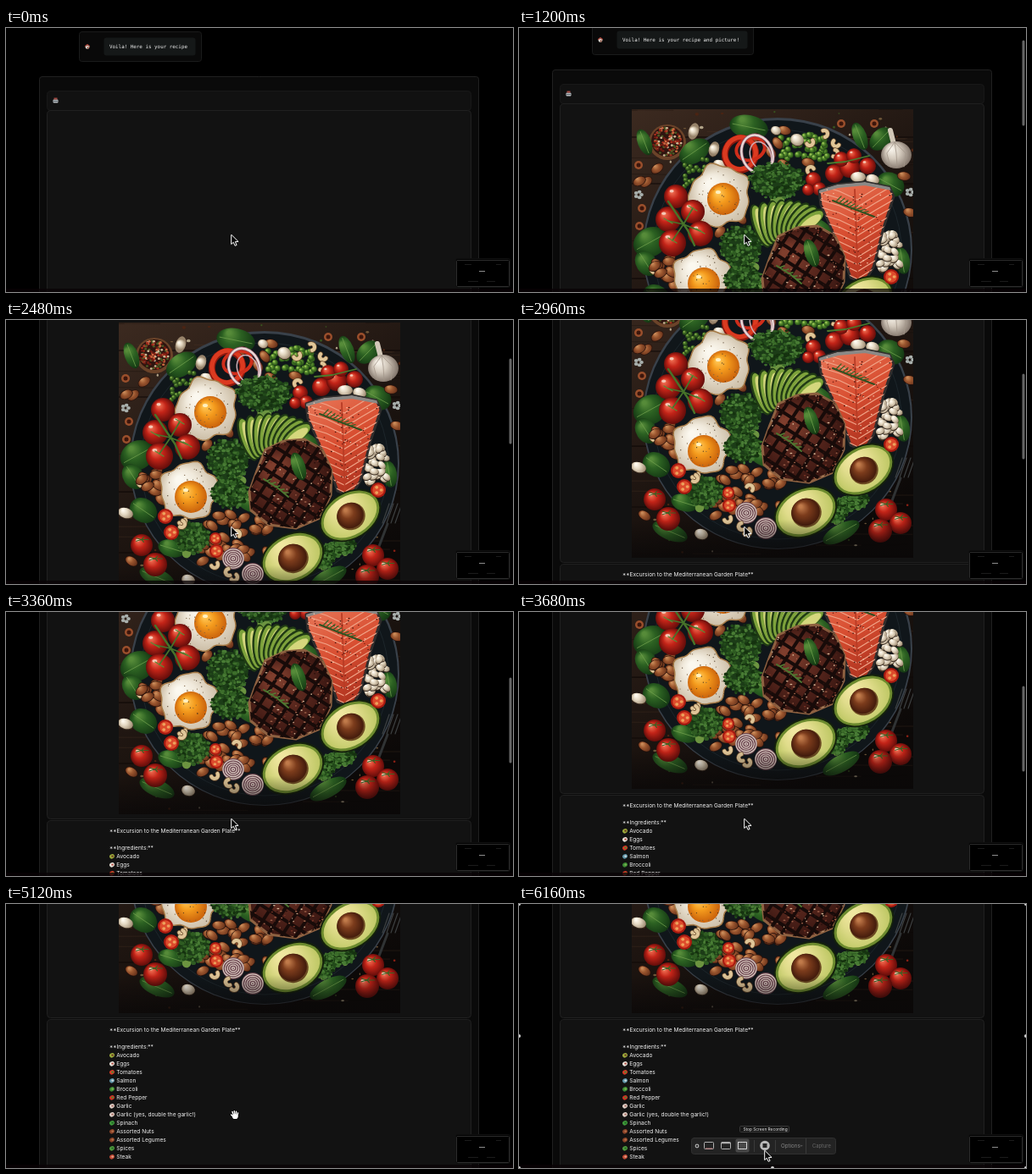
Write an HTML page with a canvas that moves like this. It is 598 px wide and 312 px high and loops after 6240 ms.

```html
<!DOCTYPE html>
<html lang="en">
<head>
<meta charset="utf-8">
<title>Recipe board</title>
<style>
  html, body { margin: 0; width: 100%; height: 100%; overflow: hidden; background: #000; }
  canvas { display: block; width: 598px; height: 312px; }
</style>
</head>
<body>
<canvas id="stage" width="598" height="312"></canvas>
<script>
const W = 598, H = 312, LOOP = 6240, STEP = 80;
const MONO = '5.88px "DejaVu Sans Mono", monospace';
const SANS = '6.6px Inter, sans-serif';
const stage = document.getElementById('stage').getContext('2d');

let seed = 7;
const rnd = () => {
  seed = (seed * 16807) % 2147483647;
  return seed / 2147483647;
};
const between = (a, b) => a + rnd() * (b - a);
const pick = list => list[Math.floor(rnd() * list.length)];

function oval(g, x, y, rx, ry, color, turn = 0) {
  g.beginPath();
  g.ellipse(x, y, rx, ry, turn, 0, 7);
  g.fillStyle = color;
  g.fill();
}
function line(g, points, color, width) {
  g.beginPath();
  points.forEach(([x, y]) => g.lineTo(x, y));
  g.strokeStyle = color;
  g.lineWidth = width;
  g.stroke();
}
function box(g, x, y, w, h, r, fill, border) {
  g.beginPath();
  g.roundRect(x + 0.5, y + 0.5, w - 1, h - 1, r);
  if (fill) { g.fillStyle = fill; g.fill(); }
  if (border) { g.strokeStyle = border; g.lineWidth = 1; g.stroke(); }
}
function text(g, str, x, y, font, color) {
  g.font = font;
  g.fillStyle = color;
  g.fillText(str, x, y);
}

// ---- The dish, painted once ----
function paintDish() {
  const c = document.createElement('canvas');
  c.width = c.height = 332;
  const g = c.getContext('2d');
  g.lineCap = g.lineJoin = 'round';

  const shade = (x, y, r, light, mid, dark) => {
    const s = g.createRadialGradient(x - r * .35, y - r * .4, r * .1, x, y, r * 1.05);
    s.addColorStop(0, light);
    s.addColorStop(.4, mid);
    s.addColorStop(1, dark);
    return s;
  };
  const tomato = (x, y, r) => {
    oval(g, x, y, r, r, shade(x, y, r, '#ee6b4f', '#c32418', '#5c0b09'));
    oval(g, x - r * .35, y - r * .45, r * .18, r * .12, '#f6c9b8');
  };
  const halfTomato = (x, y, r) => {
    oval(g, x, y, r, r, '#a81a10');
    oval(g, x, y, r * .75, r * .75, '#dd4b2c');
    for (let a = 0; a < 6; a += 2.1)
      oval(g, x + Math.cos(a) * r * .4, y + Math.sin(a) * r * .4, r * .22, r * .2, '#eda25c');
  };
  const leaf = (x, y, rx, ry, turn) => {
    oval(g, x, y, rx, ry, shade(x, y, Math.max(rx, ry), '#568b39', '#2c6122', '#123512'), turn);
    const dx = Math.cos(turn) * rx * .85, dy = Math.sin(turn) * rx * .85;
    line(g, [[x - dx, y - dy], [x + dx, y + dy]], '#6f9f4c', .8);
  };
  const almond = (x, y, turn = between(-1, 1)) => {
    oval(g, x, y, 8.2, 5.5, '#2a120b', turn);
    oval(g, x, y, 7.5, 4.8, shade(x, y, 8, '#c98a58', '#9a552e', '#5c2b17'), turn);
  };
  const bean = (x, y, rx, ry, turn = between(-1, 1)) => {
    oval(g, x, y + 1, rx, ry, '#3a2c20', turn);
    oval(g, x, y, rx, ry, shade(x, y, rx, '#fffaf0', '#e4d8c2', '#97836a'), turn);
  };
  const cashew = (x, y, a = between(0, 6)) => {
    g.beginPath();
    g.arc(x, y, 4, a, a + 3.3);
    g.strokeStyle = '#6c4c2e'; g.lineWidth = 5.6; g.stroke();
    g.strokeStyle = '#e0c698'; g.lineWidth = 4.2; g.stroke();
  };
  const broccoli = (x, y, rx, ry, stemX, stemY) => {
    line(g, [[x, y], [stemX, stemY]], '#6c9440', rx * .5);
    oval(g, x, y, rx * .92, ry * .9, '#1c3c17');
    for (let i = 0; i < rx * 7; i++) {
      const a = between(0, 6.3), d = Math.sqrt(rnd());
      oval(g, x + Math.cos(a) * rx * d, y + Math.sin(a) * ry * d, between(1, 3), between(1, 2.4),
        pick(['#15320f', '#224a1a', '#2f5c22', '#3d6e2b', '#497c35']));
    }
  };
  const friedEgg = (x, y, rx, ry, yx, yy) => {
    g.beginPath();
    for (let a = 0; a < 6.28; a += .1) {
      const k = 1 + .07 * Math.sin(a * 5 + x) + .04 * Math.sin(a * 9);
      g.lineTo(x + Math.cos(a) * rx * k, y + Math.sin(a) * ry * k);
    }
    g.closePath();
    g.fillStyle = shade(x, y, rx, '#fbf8ef', '#f0e9db', '#cdbfa8');
    g.fill();
    g.strokeStyle = '#a67b48'; g.lineWidth = 1.5; g.stroke();
    oval(g, yx, yy, 19, 19, shade(yx, yy, 19, '#ffc552', '#f49b1d', '#c75e0a'));
    oval(g, yx - 6, yy - 8, 3, 2, '#fff0c0');
    for (let i = 0; i < 45; i++)
      oval(g, x + between(-.8, .8) * rx, y + between(-.8, .8) * ry, .6, .6, pick(['#45311f', '#7b6140']));
  };
  const avocado = (x, y, rx, ry, turn, pit) => {
    oval(g, x, y, rx + 2, ry + 2, '#14210c', turn);
    oval(g, x, y, rx, ry, '#6c8a2e', turn);
    oval(g, x, y, rx - 3, ry - 3, shade(x, y, rx, '#f0e6a0', '#e0dc8b', '#b5c25a'), turn);
    oval(g, x + 1, y + 1, pit + 1, pit, '#6b4a22', turn);
    oval(g, x, y, pit, pit - 1, shade(x, y, pit, '#c07a4a', '#7c3c1c', '#3c170a'), turn);
  };
  const ring = (x, y, rx, ry, color, width, turn = 0) => {
    g.beginPath();
    g.ellipse(x, y, rx, ry, turn, 0, 7);
    g.strokeStyle = color; g.lineWidth = width; g.stroke();
  };
  const onion = (x, y, r) => {
    oval(g, x, y, r, r, '#6c4650');
    for (let k = r - 1; k > 1; k -= 2.6) ring(x, y, k, k * .92, '#dccdc3', 1.2);
  };

  // Table
  const wood = g.createLinearGradient(0, 0, 200, 332);
  wood.addColorStop(0, '#3c2a20');
  wood.addColorStop(.5, '#211712');
  wood.addColorStop(1, '#0c0908');
  g.fillStyle = wood;
  g.fillRect(0, 0, 332, 332);
  g.globalAlpha = .35;
  for (let i = 0; i < 90; i++) {
    const x = between(-40, 320), y = between(0, 332);
    line(g, [[x, y], [x + between(20, 80), y + between(-1, 1)]], pick(['#0d0806', '#553c2b']), .8);
  }
  g.globalAlpha = 1;
  [33, 88, 200, 272].forEach(y => line(g, [[0, y], [332, y]], '#0e0806', 1.2));

  g.translate(-133, -3);
  for (let i = 0; i < 70; i++) {
    const a = between(0, 6.3), d = between(160, 205);
    oval(g, 300 + Math.cos(a) * d, 170 + Math.sin(a) * d, between(.6, 2.4), between(.6, 2),
      pick(['#8c2015', '#6f5638', '#b0a287', '#38531f', '#4b2413']));
  }
  oval(g, 305, 169, 159, 156, '#39414a');
  oval(g, 305, 170, 157, 154, '#10161a');
  ring(305, 170, 146, 143, '#1d262b', 1);

  // Spices and things on the table
  oval(g, 175, 42, 22, 21, '#6b4329');
  oval(g, 175, 41, 19, 18, '#2f1510');
  for (let i = 0; i < 130; i++) {
    const a = between(0, 6.3), d = Math.sqrt(rnd()) * 17;
    oval(g, 175 + Math.cos(a) * d, 41 + Math.sin(a) * d, 1.5, 1.3,
      pick(['#a32d1c', '#cbb795', '#6f1b12', '#4b5b25', '#d0663f']));
  }
  [[141, 69], [145, 120], [142, 141], [419, 20], [380, 20]].forEach(([x, y]) => {
    oval(g, x, y, 5, 5, '#9a4f2c');
    oval(g, x, y, 2.5, 2.5, '#3c160c');
  });
  [[141, 104], [461, 101]].forEach(([x, y]) => {
    for (let a = 0; a < 6; a += 1.26) oval(g, x + Math.cos(a) * 3.5, y + Math.sin(a) * 3.5, 2.3, 2, '#a9b0ad');
  });
  for (const x of [444, 449, 454, 459]) line(g, [[x + 8, 217], [x, 240]], '#3d4041', 1.2);
  line(g, [[450, 241], [436, 278]], '#303334', 3);

  // Greens
  [[271, 24, 23, 14, .2], [207, 53, 20, 13, -.6], [148, 42, 16, 8, 1.2], [155, 160, 21, 17, -.5],
   [162, 225, 17, 14, .6], [150, 185, 16, 12, 1], [402, 35, 17, 8, 1.2], [427, 38, 16, 11, -.8],
   [438, 92, 17, 14, .5], [452, 182, 16, 9, 1.4], [178, 304, 22, 10, .4], [380, 305, 24, 10, -.5],
   [230, 92, 18, 12, .2], [355, 150, 22, 14, .8], [290, 215, 20, 12, .4], [195, 270, 16, 10, .3]
  ].forEach(p => leaf(...p));
  for (let i = 0; i < 55; i++) {
    const x = between(308, 366), y = between(33, 62);
    oval(g, x, y, 3.6, 3.6, shade(x, y, 3.6, '#a4c95c', '#558b2b', '#204615'));
  }
  for (let i = 0; i < 26; i++) {
    const x = between(195, 225), y = between(62, 95);
    oval(g, x, y, 3, 3, shade(x, y, 3, '#8eb252', '#436f24', '#193712'));
  }

  // Nuts and beans
  [[150, 89], [163, 73], [142, 88], [305, 43], [297, 54], [277, 38], [313, 28], [454, 82], [461, 125],
   [341, 66], [237, 148], [262, 132], [148, 285], [232, 285], [312, 68]].forEach(([x, y]) => almond(x, y));
  [[206, 29, 6, 10], [230, 50, 6, 9], [328, 39, 8, 7], [303, 28, 6, 5], [141, 228, 9, 6],
   [215, 307, 8, 6], [237, 68, 8, 5]].forEach(p => bean(...p, .3));
  [[343, 42], [374, 43], [360, 32], [372, 55], [344, 75], [160, 192], [178, 193], [208, 238]].forEach(p => cashew(...p));
  for (let i = 0; i < 28; i++) bean(between(424, 449), between(148, 192), 5.5, 3.6);
  for (let i = 0; i < 12; i++) almond(between(158, 184), between(178, 214));
  for (let i = 0; i < 34; i++) almond(between(228, 312), between(229, 280));

  // Peppers, onion, garlic
  ring(261, 56, 18, 19, '#8c170d', 8, .4);
  ring(261, 55, 18, 19, '#db3a20', 5.5, .4);
  ring(273, 50, 17, 13, '#cf2d1a', 4, -.3);
  ring(281, 56, 18, 23, '#8d5a6c', 4, -.35);
  ring(281, 56, 18, 23, '#ead8d6', 2.4, -.35);
  ring(285, 58, 12, 17, '#cfaeb6', 1.5, -.35);
  line(g, [[438, 28], [443, 48]], '#d2c8b8', 6);
  oval(g, 445, 57, 18, 16, shade(445, 57, 18, '#f6f1e8', '#d4cabd', '#776a60'));
  [-8, 0, 8].forEach(d => line(g, [[443, 42], [445 + d * 1.4, 55], [446 + d, 71]], '#a4978b', .8));

  // Eggs and vine tomatoes
  friedEgg(237, 105, 35, 36, 241, 109);
  friedEgg(216, 202, 34, 33, 218, 209);
  [[185, 106, 14], [205, 124, 14], [176, 133, 15], [214, 150, 15], [181, 161, 16]].forEach(p => tomato(...p));
  line(g, [[176, 112], [188, 130], [199, 146], [207, 164]], '#47732a', 2.4);
  [[205, 120], [176, 135], [214, 147], [181, 158]].forEach(([x, y]) => {
    line(g, [[194, 139], [x, y]], '#47732a', 1.7);
    line(g, [[x - 5, y - 3], [x + 5, y + 3]], '#5c8a35', 1.4);
  });
  [[372, 79, 11], [390, 72, 12], [380, 62, 9], [395, 58, 9], [411, 70, 10], [347, 86, 9],
   [354, 97, 8], [341, 98, 7]].forEach(p => tomato(...p));
  line(g, [[364, 67], [385, 65], [413, 58]], '#4c7b2e', 1.8);
  bean(400, 83, 9, 6, 0);
  bean(417, 86, 8, 6, .3);

  broccoli(304, 87, 33, 22, 305, 116);
  broccoli(262, 165, 26, 25, 275, 192);
  broccoli(264, 203, 22, 20, 278, 190);

  // Avocado fan
  for (let i = 0; i < 9; i++) {
    const x = 285 + i * 7.2, y = 141 - Math.sin(i / 8 * 2.4) * 9;
    const a = -.35 + i * .16;
    g.save();
    g.translate(x, y);
    g.rotate(a);
    oval(g, 0, 0, 9, 27 - i * .8, '#203b14');
    oval(g, 1, 0, 7.5, 25 - i * .8, '#7da23b');
    oval(g, 2.5, 1, 5.5, 22 - i * .8, '#d5d77d');
    g.restore();
  }

  // Salmon
  const trace = pts => {
    g.beginPath();
    pts.forEach(([x, y]) => g.lineTo(x, y));
    g.closePath();
  };
  g.save();
  trace([[354, 99], [375, 92], [408, 89], [437, 95], [442, 106], [430, 143], [418, 190], [407, 208],
         [391, 202], [382, 176], [366, 139], [356, 116]]);
  const flesh = g.createLinearGradient(355, 90, 420, 205);
  flesh.addColorStop(0, '#e9795a');
  flesh.addColorStop(.5, '#d84e31');
  flesh.addColorStop(1, '#a92f1d');
  g.fillStyle = flesh;
  g.fill();
  g.strokeStyle = '#302d2c'; g.lineWidth = 3; g.stroke();
  g.clip();
  for (let y = 98; y < 240; y += 8.5)
    line(g, [[352, y - 6], [378, y + 2], [399, y + 12], [420, y - 1], [446, y - 16]], '#f0a286', 1.3);
  line(g, [[396, 98], [400, 210]], '#b83c25', 1.8);
  line(g, [[354, 100], [376, 94], [408, 91], [440, 97]], '#8b8986', 4);
  for (let i = 0; i < 130; i++)
    oval(g, between(355, 440), between(98, 204), .9, .7, pick(['#42150f', '#f5c0a2', '#7b2014']));
  g.restore();
  line(g, [[370, 111], [390, 119], [419, 130]], '#324e20', 2);
  for (let i = 0; i < 9; i++) line(g, [[374 + i * 4, 112 + i * 1.6], [380 + i * 4, 106 + i * 2.2]], '#3c6027', 1.3);

  // Steak
  g.save();
  trace([[306, 153], [328, 143], [352, 141], [373, 153], [384, 177], [383, 207], [370, 234], [342, 246],
         [310, 242], [289, 225], [287, 203], [296, 178]]);
  g.fillStyle = shade(335, 195, 55, '#7f3e2d', '#5b281e', '#32130f');
  g.fill();
  g.strokeStyle = '#8e6141'; g.lineWidth = 3; g.stroke();
  g.clip();
  for (let d = -90; d < 100; d += 17) {
    line(g, [[275 + d, 250], [350 + d, 135]], '#180b09', 4);
    line(g, [[280, 165 + d], [390, 235 + d]], '#180b09', 4);
  }
  for (let i = 0; i < 210; i++)
    oval(g, between(288, 383), between(143, 245), between(.5, 1.6), .8,
      pick(['#a2634a', '#27100c', '#763426', '#d5b696', '#4d2119']));
  g.restore();
  leaf(345, 173, 17, 8, 1.25);
  line(g, [[304, 188], [320, 198], [333, 209]], '#4b7530', 2);
  for (let i = 0; i < 5; i++) line(g, [[308 + i * 5, 190 + i * 3.5], [313 + i * 5, 188 + i * 4]], '#547d34', 1.5);

  // Lower plate
  broccoli(220, 257, 21, 19, 213, 276);
  [[384, 272], [400, 267], [374, 284]].forEach(([x, y]) => broccoli(x, y, 12, 10, x, y + 9));
  avocado(406, 231, 37, 26, -.55, 16);
  avocado(338, 281, 37, 27, -.45, 17);
  [[439, 201, 9], [188, 232, 9], [195, 251, 9], [247, 258, 7], [248, 273, 8]].forEach(p => halfTomato(...p));
  onion(268, 282, 13);
  onion(291, 300, 13);
  [[272, 253], [246, 289], [263, 298], [269, 304], [207, 241]].forEach(p => cashew(...p));
  [[160, 266, 13], [176, 289, 14], [433, 278, 13], [450, 294, 13], [426, 303, 14]].forEach(([x, y, r]) => {
    tomato(x, y, r);
    for (let a = 0; a < 6; a += 1.26)
      line(g, [[x, y - r * .5], [x + Math.cos(a) * r * .6, y - r * .5 + Math.sin(a) * 3]], '#3b6123', 1.2);
  });

  const fade = g.createLinearGradient(0, 290, 0, 335);
  fade.addColorStop(0, 'rgba(10,8,8,0)');
  fade.addColorStop(1, 'rgba(10,8,8,.75)');
  g.fillStyle = fade;
  g.fillRect(133, 290, 332, 46);
  return c;
}
const dish = paintDish();

// ---- Motion ----
// Each knot: time, offset, speed
const knots = [[800, 0, 0], [1760, 40, .075], [2480, 101, .1], [2960, 155, .11], [3680, 227, .09], [4960, 306.5, 0]];
function scrollAt(t) {
  if (t <= knots[0][0]) return 0;
  for (let i = 1; i < knots.length; i++) {
    const [t0, y0, v0] = knots[i - 1], [t1, y1, v1] = knots[i];
    if (t > t1) continue;
    const d = t1 - t0, u = (t - t0) / d, w = 1 - u;
    return y0 * w * w * (1 + 2 * u) + y1 * u * u * (1 + 2 * w) + d * u * w * (v0 * w - v1 * u);
  }
  return knots[knots.length - 1][1];
}

const GREETING = 'Voila! Here is your recipe';
const ENDING = ' and picture!';
const ingredients = [
  ['Avocado', '#9bab3c', '#6f3e20'], ['Eggs', '#e9e3da', '#b5554a'], ['Tomatoes', '#d63a25', '#4a8a32'],
  ['Salmon', '#5f95a8', '#d5dde0'], ['Broccoli', '#3d8a34', '#79b650'], ['Red Pepper', '#d13222', '#4a8a32'],
  ['Garlic', '#e0d0c8', '#a9746a'], ['Garlic (yes, double the garlic!)', '#e0d0c8', '#a9746a'],
  ['Spinach', '#3f9a3b', '#256b27'], ['Assorted Nuts', '#8a4328', '#b9724a'],
  ['Assorted Legumes', '#8a4328', '#b9724a'], ['Spices', '#4f9a3d', '#2c6c2b'], ['Steak', '#c14a36', '#e6a58a']
];

function drawBoard(g, t) {
  const typed = Math.round(ENDING.length * Math.min(t / 720, 1));
  const grow = typed * 3.54;
  box(g, 86, 4, 145 + grow, 36, 3, '#090909', '#1a1b1b');
  box(g, 115, 11, 109 + grow, 22, 3, '#151818');
  oval(g, 96, 22.5, 2.4, 2.3, '#d8d2cb');
  line(g, [[93.5, 21.5], [96, 19.5], [98.5, 21.5]], '#a8453a', 1.2);
  oval(g, 96.7, 23.4, .9, 1.2, '#8f4a38');
  text(g, GREETING + ENDING.slice(0, typed), 122, 24, MONO, '#f0f0f0');

  box(g, 39, 57, 519, 620, 3, '#0a0a0a', '#202020');
  box(g, 48, 74, 501, 24, 4, '#111', '#181818');
  box(g, 55, 84, 7, 5, 1, '#b9bec2');
  box(g, 56, 82, 5, 3, 0, '#a34a44');
  g.fillStyle = '#59636a';
  g.fillRect(56, 86, 5, 1);
  box(g, 48, 97, 501, 345, 4, '#121212', '#202020');
  if (t >= 880) g.drawImage(dish, 133, 104);

  box(g, 48, 443, 501, 200, 4, '#121212', '#202020');
  text(g, '**Excursion to the Mediterranean Garden Plate**', 122, 458, SANS, '#f2f2f2');
  text(g, '**Ingredients:**', 122, 478, SANS, '#f2f2f2');
  ingredients.forEach(([name, main, accent], i) => {
    const y = 488 + i * 10;
    oval(g, 125, y - 2.2, 3, 2.6, main, -.5);
    oval(g, 125.6, y - 2.4, 1.3, 1.2, accent);
    text(g, name, 130.3, y, SANS, '#f2f2f2');
  });
}

function drawMinimap(g) {
  box(g, 530, 272, 65, 35, 2, '#000', '#111');
  box(g, 531, 274, 63, 32, 1, '#000', '#2c2c2c');
  g.fillStyle = '#1b1b1b';
  [[541, 279, 8], [578, 279, 6], [545, 299, 12], [567, 299, 10]].forEach(([x, y, w]) => g.fillRect(x, y, w, 1));
  g.fillStyle = '#8d8d8d';
  g.fillRect(558, 287, 7, 1);
}

function drawArrow(g, x, y) {
  g.beginPath();
  [[0, 0], [0, 11], [2.6, 8.8], [4.4, 12.8], [6.4, 12], [4.7, 8.1], [8, 8]].forEach(([dx, dy]) => g.lineTo(x + .7 + dx, y + .5 + dy));
  g.closePath();
  g.fillStyle = '#080808';
  g.fill();
  g.strokeStyle = '#fff';
  g.lineWidth = 1;
  g.stroke();
}

function drawHand(g) {
  const fingers = [[267, 245.5, 268.5, 250], [269.3, 244.7, 270, 250], [271.6, 245.2, 271.4, 250],
                   [273.6, 247, 272.6, 251], [265.6, 249, 268, 251.6]];
  for (const [color, extra] of [['#000', 1.4], ['#fff', 0]]) {
    for (const [a, b, c, d] of fingers) line(g, [[a, b], [c, d]], color, 1.5 + extra);
    oval(g, 270.3, 251.2, 3.3 + extra / 2, 2.9 + extra / 2, color);
  }
}

function drawRecorder(g) {
  box(g, 203, 276, 171, 20, 3, '#232323', '#303030');
  g.lineWidth = 1.3;
  g.strokeStyle = '#aaa';
  g.beginPath();
  g.arc(210, 286, 1.8, 0, 7);
  g.stroke();
  box(g, 218, 281, 12, 9, 1, null, '#b0b0b0');
  line(g, [[220, 289], [228, 289]], '#b97878', 1);
  box(g, 238, 281, 12, 9, 1, null, '#b0b0b0');
  line(g, [[239, 282.5], [249, 282.5]], '#b0b0b0', 1.4);
  box(g, 255, 277, 17, 17, 2, '#484848');
  g.setLineDash([2, 1]);
  box(g, 258, 281, 11, 9, 0, null, '#e0e0e0');
  g.setLineDash([]);
  g.fillStyle = '#3a3a3a';
  g.fillRect(277, 279, 1, 14);
  g.fillRect(302, 279, 1, 14);
  g.fillRect(338, 277, 1, 18);
  oval(g, 290, 285.5, 5.8, 5.8, '#b9b9b9');
  g.fillStyle = '#242424';
  g.fillRect(287.5, 283, 5, 5);
  text(g, 'Options', 309, 288, '6.2px Inter, sans-serif', '#858585');
  line(g, [[332, 285.3], [333, 286.3], [334, 285.3]], '#858585', .7);
  text(g, 'Capture', 346, 288, '5.8px Inter, sans-serif', '#6a6a6a');
  box(g, 260, 262, 59, 8, 1, '#161616', '#383838');
  text(g, 'Stop Screen Recording', 264.5, 268, '4.8px Inter, sans-serif', '#f0f0f0');
  [[0, 0], [W, 0], [0, 156], [W, 156], [299, H], [0, H], [W, H]].forEach(([x, y]) => oval(g, x, y, 2, 2, '#d8d8d8'));
}

function draw(t) {
  const g = stage;
  const scroll = Math.round(scrollAt(t));
  g.lineCap = g.lineJoin = 'round';
  g.fillStyle = '#000';
  g.fillRect(0, 0, W, H);
  g.save();
  g.translate(0, -scroll);
  drawBoard(g, t);
  g.restore();
  g.fillStyle = 'rgba(8,2,4,.75)';
  g.fillRect(0, 308, W, 4);
  drawMinimap(g);

  if (t >= 880 && t < 5120) {
    g.globalAlpha = Math.min(1, (5120 - t) / 240);
    box(g, 593, 11 + Math.round(scroll / 3), 4, 102, 2, '#666');
    g.globalAlpha = 1;
  }
  if (t >= 6000) {
    drawRecorder(g);
    drawArrow(g, 289, 291);
  } else if (t >= 4960) drawHand(g);
  else drawArrow(g, 265, 244);
}

const start = performance.now();
function tick() {
  const t = (performance.now() - start) % LOOP;
  draw(Math.floor(t / STEP) * STEP);
  requestAnimationFrame(tick);
}
tick();
</script>
</body>
</html>
```
